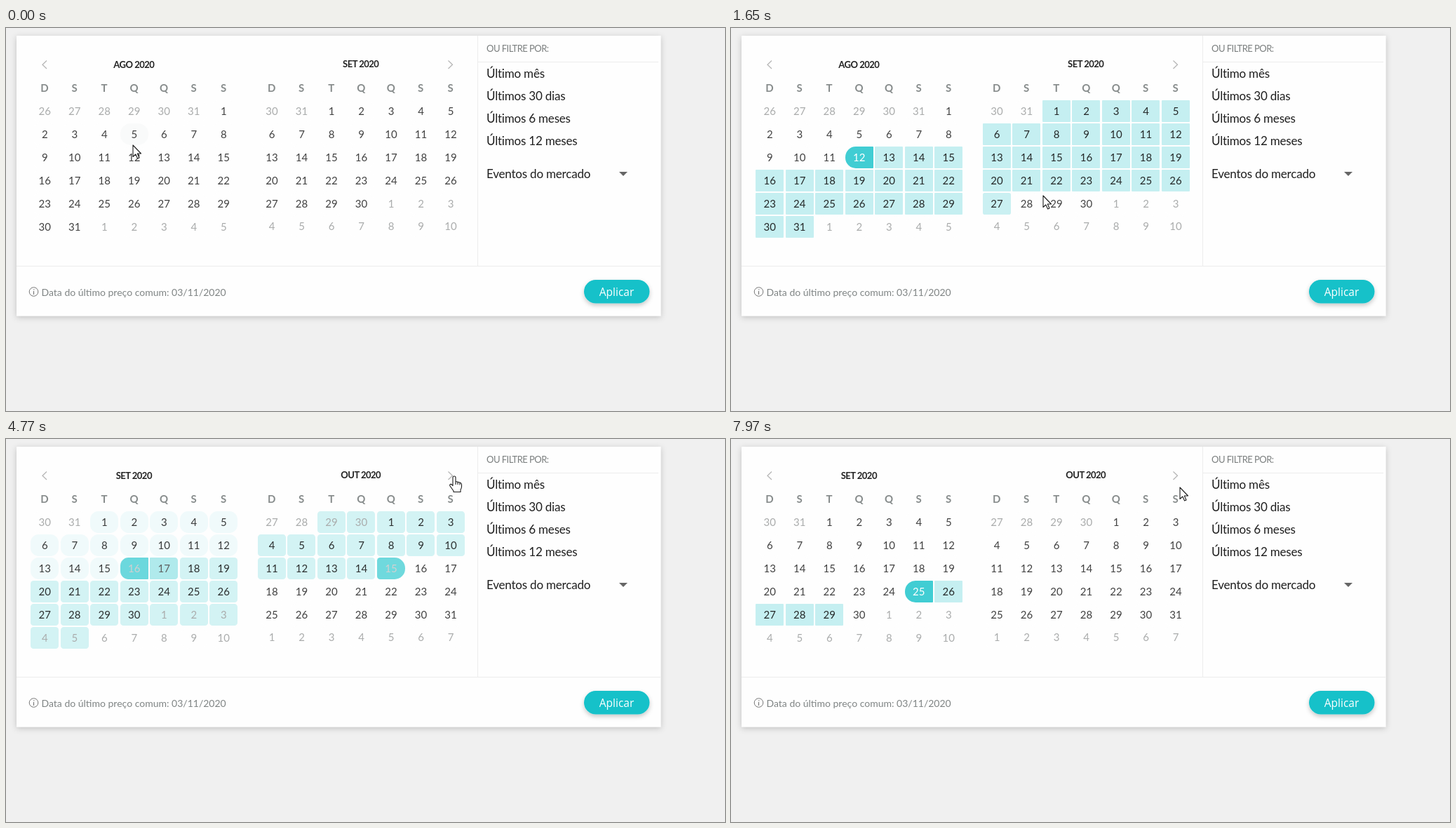
An HTML page that plays this animation: 1025x546 px, repeating every 8 s.

```html
<!DOCTYPE html>
<html lang="pt">
<head>
<meta charset="utf-8">
<title>Filtro de datas</title>
<style>
  html, body { margin: 0; width: 100%; height: 100%; overflow: hidden; background: #f0f0f0; }
  svg { display: block; width: 100vw; height: 100vh; font-family: Lato, sans-serif; }
  .mid { text-anchor: middle; }
  .title { font-size: 13px; font-weight: 700; letter-spacing: -.5px; fill: #222; }
  .week { font-size: 15px; font-weight: 700; fill: #878c8c; }
  .day { font-size: 15px; }
  .item { font-size: 17px; letter-spacing: -.2px; fill: #1f1f1f; }
  .apply { font: 500 15.5px 'Open Sans', sans-serif; fill: #fff; }
  .rule { stroke: #ececec; }
  .line { fill: none; stroke: #b4b4b4; stroke-width: 1.2; }
  .cursor { fill: #fff; stroke: #1c1c1c; stroke-width: 1.1; stroke-linejoin: round; }
</style>
</head>
<body>
<svg id="stage" viewBox="0 0 1025 546">
  <defs>
    <filter id="soft" x="-10%" y="-10%" width="120%" height="130%">
      <feDropShadow dx="0" dy="2" stdDeviation="4" flood-opacity=".2"/>
    </filter>
    <filter id="lift" x="-20%" y="-20%" width="140%" height="170%">
      <feDropShadow dx="0" dy="3" stdDeviation="3" flood-opacity=".22"/>
    </filter>
  </defs>
  <rect width="1025" height="546" fill="#f0f0f0"/>
  <rect x="15" y="11" width="918.5" height="399.5" fill="#fefefe" filter="url(#soft)"/>
  <path class="rule" d="M672.5 11V339M15 339.5H933M673 48.5H930"/>
  <path class="line" d="M58 46.5L52 52.2 58 58M630.5 46.5L636.5 52.2 630.5 58"/>

  <text x="685" y="34" font-size="13" letter-spacing="-.53" fill="#7b7f7f">OU FILTRE POR:</text>
  <g class="item">
    <text x="685" y="71">Último mês</text>
    <text x="685" y="103">Últimos 30 dias</text>
    <text x="685" y="135">Últimos 6 meses</text>
    <text x="685" y="167">Últimos 12 meses</text>
    <text x="685" y="214">Eventos do mercado</text>
  </g>
  <path d="M874 205H886L880 211Z" fill="#666"/>

  <circle cx="39.5" cy="376" r="6.3" fill="none" stroke="#777"/>
  <path d="M39.8 372.2V373.6M39.5 375V380" stroke="#777" stroke-width="1.2"/>
  <text x="50.5" y="382" font-size="14" fill="#7f8484">Data do último preço comum: 03/11/2020</text>

  <rect x="824" y="359" width="93.5" height="33.5" rx="16.75" fill="#13c1c9" filter="url(#lift)"/>
  <text class="mid apply" x="870.5" y="382">Aplicar</text>

  <g id="grids"></g>
  <circle id="press" cx="553" cy="178.5" r="14" fill="#000" opacity=".05"/>
  <g id="cursor" class="cursor">
    <path id="arrow" d="M0 0V16.5L3.8 13 6.6 19 9 18 6.3 12H11.5Z"/>
    <path id="hand" d="M-2 2Q-2 0 0 0T2 2V7.5L5 8.2 8.5 9.3Q10.5 10 10.5 12V15Q10.5 17 9 19.5V22.5H-1V21L-6 14Q-7 12 -5 11.4Q-4 11.2 -2 13.6ZM2 7.5V12M5 8.2V12M8 9.2V12.5"/>
  </g>
</svg>
<script>
const LOOP = 8000, TICK = 78.1, SWITCH = 4686;
const WHITE = [254, 254, 254], HOVER = [249, 250, 250];
const RANGE = [197, 239, 241], PICK = [65, 205, 211];
const DARK = [66, 66, 66], MUTED = [170, 172, 172];
const MONTHS = { 7: 'AGO', 8: 'SET', 9: 'OUT' };
const $ = id => document.getElementById(id);

// Pointer tip: [tick, x, y, hand]
const PATH = [
  [0, 181, 167, 0], [4, 198, 195, 1], [5, 198, 195, 1], [6, 196, 192, 1],
  [12, 196, 192, 1], [17, 340, 238, 1], [21, 445, 239, 0], [25, 505, 226, 0],
  [30, 548, 176, 1], [32, 554, 178, 1], [48, 554, 178, 1], [53, 647, 47, 1],
  [54, 647, 47, 1], [55, 643, 49, 1], [57, 639, 53, 1], [71, 639, 53, 1],
  [72, 575, 61, 1], [82, 281, 209, 1], [86, 281, 209, 1], [90, 377, 219, 1],
  [94, 500, 190, 1], [98, 600, 130, 1], [102, 640, 69, 0]
];

const lerp = (a, b, p) => a + (b - a) * p;
const ramp = (t, a, b) => Math.min(1, Math.max(0, (t - a) / (b - a)));
const blend = (a, b, p) => a.map((v, i) => lerp(v, b[i], p));
const rgb = c => `rgb(${c.map(Math.round)})`;

function add(tag, attrs) {
  const el = document.createElementNS('http://www.w3.org/2000/svg', tag);
  for (const k in attrs) el.setAttribute(k, attrs[k]);
  return $('grids').appendChild(el);
}

function label(cls, x, y, text = '') {
  const el = add('text', { class: 'mid ' + cls, x, y });
  el.textContent = text;
  return el;
}

const grids = [{ x: 35, y: 103, step: 33 }, { x: 358.7, y: 102.7, step: 32.95 }];
grids.forEach((g, side) => {
  g.title = label('title', side ? 505.7 : 182.3, side ? 56 : 56.5);
  [...'DSTQQSS'].forEach((d, i) => label('week', g.x + 20 + i * 42.5, 91, d));
  g.cells = Array.from({ length: 42 }, (_, i) => {
    const left = g.x + i % 7 * 42.5, top = g.y + Math.floor(i / 7) * g.step;
    return {
      x: Math.round(left), y: Math.round(top),
      box: add('path', {}),
      text: label('day', left + 20.3, Math.round(top + 21))
    };
  });
});

// Day number counted from 1 August, or 0 for days outside the month.
function dayAt(month, slot) {
  const date = new Date(2020, month, 1 - new Date(2020, month, 1).getDay() + slot);
  const inside = date.getMonth() === month;
  const offset = { 7: 0, 8: 31, 9: 61 }[month];
  return { num: date.getDate(), inside, n: inside ? date.getDate() + offset : 0 };
}

const within = (n, a, b) => n >= a && n <= b;
const open = (p, k) => Math.min(15, Math.max(1, k * (1 - p)));

// Look of a day: [range, picked, left radius, right radius]
function look(n, t) {
  const old = 1 - ramp(t, 6700, 7045);
  const ranged = f => [f, 0, open(f, 28), open(f, 28)];
  if (n === 12) {
    const s = ramp(t, 704, 990) * old;
    return [0, s, 15, open(s, 40)];
  }
  if (t > 6600 && n === 56) {
    const s = ramp(t, 6700, 7045);
    return [0, s, 15, open(s, 40)];
  }
  if (t > 6600 && within(n, 57, 78)) {
    const out = n > 60 ? ramp(t, 7420, 7750) : 0;
    return ranged(ramp(t, 7050, 7360) * (1 - out));
  }
  if (n === 48 && t > 2900) {
    const s = ramp(t, 2960, 3310) * old;
    return [0, s, open(s, 40), 15];
  }
  if (within(n, 13, 61)) {
    const f = ramp(t, 704, 990) * old;
    if (n < 48) return ranged(f);
    const off = n > 58 ? 1380 : 1620 + (58 - n) * 45;
    return ranged(f * (1 - ramp(t, off, off + 200)));
  }
  return [0, 0, 15, 15];
}

function pill(x, y, l, r) {
  const w = 40, h = 31;
  return `M${x + l} ${y}H${x + w - r}a${r} ${r} 0 0 1 ${r} ${r}V${y + h - r}` +
    `a${r} ${r} 0 0 1 ${-r} ${r}H${x + l}a${l} ${l} 0 0 1 ${-l} ${-l}V${y + l}a${l} ${l} 0 0 1 ${l} ${-l}Z`;
}

function pointer(k) {
  let i = 0;
  while (i < PATH.length - 1 && PATH[i + 1][0] <= k) i++;
  const a = PATH[i], b = PATH[i + 1] || a;
  const p = b === a ? 0 : (k - a[0]) / (b[0] - a[0]);
  return { x: lerp(a[1], b[1], p), y: lerp(a[2], b[2], p), hand: a[3] };
}

function draw(time) {
  const k = Math.floor(time / TICK), t = k * TICK;
  const tip = pointer(k);
  const trail = pointer(k - 2); // the hover shade lags behind the pointer
  const turned = t >= SWITCH - 1;
  const turn = ramp(t, SWITCH, 5010);

  grids.forEach((g, side) => {
    const month = 7 + side + (turned ? 1 : 0);
    g.title.textContent = MONTHS[month] + ' 2020';
    g.cells.forEach((c, i) => {
      const day = dayAt(month, i);
      let state = look(day.n, t);
      if (turned && turn < 1) state = blend(look(dayAt(month - 1, i).n, t), state, turn);
      const [f, s, l, r] = state;
      const hover = day.inside && within(trail.x, c.x, c.x + 40) && within(trail.y, c.y, c.y + 31);
      const base = blend(hover ? HOVER : WHITE, RANGE, f);
      c.box.setAttribute('d', pill(c.x, c.y, l, r));
      c.box.setAttribute('fill', rgb(blend(base, PICK, s)));
      const ink = day.inside ? blend(DARK, [38, 42, 42], f) : MUTED;
      c.text.setAttribute('fill', rgb(blend(ink, [255, 255, 255], s)));
      c.text.textContent = day.num;
    });
  });

  $('press').style.display = within(k, 36, 37) ? '' : 'none';
  $('cursor').setAttribute('transform', `translate(${tip.x.toFixed(1)} ${tip.y.toFixed(1)})`);
  $('arrow').style.display = tip.hand ? 'none' : '';
  $('hand').style.display = tip.hand ? '' : 'none';
}

const start = performance.now();
function loop() {
  draw((performance.now() - start) % LOOP);
  requestAnimationFrame(loop);
}
loop();
</script>
</body>
</html>
```
